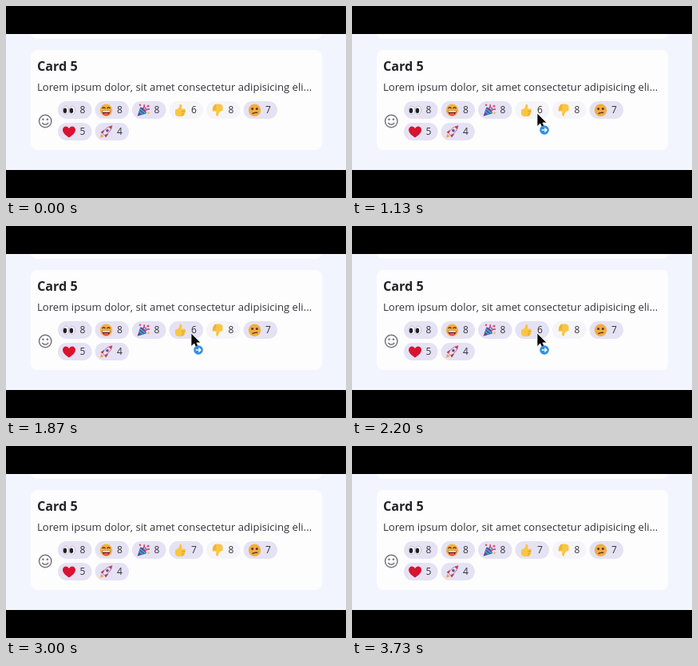
An HTML page for the animation above (3.79 s loop, 426x240 px).

```html
<!DOCTYPE html>
<html lang="en">
<head>
<meta charset="utf-8">
<title>Card reactions</title>
<style>
  html, body { margin: 0; width: 100%; height: 100%; overflow: hidden; background: #000; }
  svg { display: block; width: 426px; height: 240px; }
  text { font-family: "Open Sans", "Noto Sans", sans-serif; fill: #333338; }
</style>
</head>
<body>
<svg viewBox="0 0 426 240">
  <defs>
    <clipPath id="view"><rect y="35" width="426" height="170"/></clipPath>
    <g id="eyes">
      <g fill="#fff" stroke="#b3aebb" stroke-width=".8"><ellipse cx="-4" rx="3.6" ry="5.2"/><ellipse cx="4" rx="3.6" ry="5.2"/></g>
      <g fill="#201d25"><ellipse cx="-5" cy=".5" rx="2.2" ry="3.2"/><ellipse cx="3" cy=".5" rx="2.2" ry="3.2"/></g>
    </g>
    <g id="grin">
      <circle r="7.7" fill="#f6b13c"/>
      <path d="M-5 -2q2-3 4 0M1-2q2-3 4 0" fill="none" stroke="#5b3427" stroke-width="1.4"/>
      <path d="M-5.5 .5h11q-.8 6-5.5 6t-5.5-6z" fill="#7a2634"/>
      <path d="M-5 .7H5L4.4 2.4h-8.8z" fill="#fff"/>
      <ellipse cy="5" rx="3" ry="1.4" fill="#ef5360"/>
    </g>
    <g id="party">
      <path d="M-7.5 7.5L-3.5-4Q3-2 4 4z" fill="#5b4c96"/>
      <path d="M-5.5 1.5L0 5.4M-4.4-1.8L3.5 4.3" stroke="#39aacb" stroke-width="1.6"/>
      <path d="M-1-2q3-1 2-5M2 1q3-3 6-2" fill="none" stroke="#d63d73" stroke-width="1.7"/>
      <g fill="#e54b60"><circle cx="6" cy="-5" r="1.4"/><circle cx="-4" cy="-6.5" r="1.2"/></g>
      <circle cx="3" cy="-2.5" r="1.2" fill="#3b9bd3"/><circle cx="6.5" cy="3.5" r="1.2" fill="#edb23e"/>
    </g>
    <g id="thumb">
      <path d="M-6.5-.5L-2.8-2Q-.8-4.6-.9-7Q1.8-8.5 2-4.8L1.5-1.6H5.3Q7.4-1 6 1.1Q7 2.8 5.4 3.7Q6 5.6 4.1 6Q4 7.7 1.8 7.7H-2.7Q-6.5 7-6.5 4z" fill="#f9c644"/>
      <path d="M1.5 1.3h4.3M1.8 3.8h3.5M1.6 6h2.5" stroke="#d99226" stroke-width=".8"/>
    </g>
    <g id="down"><use href="#thumb" transform="scale(-1)"/></g>
    <g id="confused">
      <circle r="7.7" fill="#f3ac40"/>
      <g fill="#59372c"><circle cx="-2.8" cy="-1.6" r="1.5"/><circle cx="2.8" cy="-1.6" r="1.5"/></g>
      <path d="M-3 4.4Q0 2.5 3.8 3.2" fill="none" stroke="#59372c" stroke-width="1.4"/>
    </g>
    <g id="heart"><path d="M0 7.3C-5 4-8 1-8-2.5C-8-7-2-8.5 0-4C2-8.5 8-7 8-2.5C8 1 5 4 0 7.3z" fill="#d9132f"/></g>
    <g id="rocket">
      <path d="M-7.5 7.5l1.2-5 3.5 3.4z" fill="#f2a63a"/>
      <path d="M-2.5-2.8L-7 .8l3.2 1.4zM2.8 2.5L-.5 7.2l-1.8-3.4z" fill="#c72959"/>
      <path d="M-4.5 2Q-1-6 7.5-7.5Q6 1-2 4.5z" fill="#e8dfed" stroke="#a74778" stroke-width=".7"/>
      <path d="M3.2-6L7.5-7.5L6-3.2z" fill="#d92c52"/>
      <circle cx="1.5" cy="-1.5" r="1.8" fill="#56549c"/>
    </g>
  </defs>
  <g clip-path="url(#view)">
    <rect y="35" width="426" height="170" fill="#f2f5fd"/>
    <g fill="#fdfdfe"><rect x="31" y="10" width="365" height="31" rx="8"/><rect x="31" y="55" width="365" height="125" rx="8"/></g>
    <text x="39" y="80.5" font-size="16.2" font-weight="700" style="fill:#242428">Card 5</text>
    <text x="39" y="106" font-size="13.15">Lorem ipsum dolor, sit amet consectetur adipisicing eli...</text>
    <g fill="none" stroke="#77777d" stroke-width="1.5">
      <circle cx="49.2" cy="144" r="7.7"/><path d="M45.2 146q4 4.5 8 0"/>
      <g fill="#77777d" stroke="none"><circle cx="46.5" cy="141.8" r="1.3"/><circle cx="51.9" cy="141.8" r="1.3"/></g>
    </g>
    <g id="chips"></g>
    <g id="cursor">
      <path d="M0 0V16.5L3.8 13L6.8 19.6L9.8 18.2L6.9 11.9H12z" fill="#08080a" stroke="#fff" stroke-width=".7"/>
      <g id="badge">
        <circle cx="9" cy="21" r="5.8" fill="#328fe0"/>
        <path d="M5.8 21h6M9.4 18.5l2.5 2.5-2.5 2.5" fill="none" stroke="#fff" stroke-width="1.4"/>
      </g>
    </g>
  </g>
</svg>
<script>
const LOOP = 3790, SELECTED = "#e5e2f4", IDLE = "#f5f4f8";
const HOVER_AT = 1330, COUNT_AT = 2600;
const $ = id => document.getElementById(id);
const reactions = [["eyes", 8], ["grin", 8], ["party", 8], ["thumb", 6], ["down", 8], ["confused", 7], ["heart", 5], ["rocket", 4]];

$("chips").innerHTML = reactions.map(([name, count], i) => {
  const x = 65 + (i % 6) * 46.5, y = i < 6 ? 119 : 146;
  return `<g id="chip-${name}" transform="translate(${x} ${y})">
    <rect width="42.5" height="22" rx="11" fill="${name === "down" ? IDLE : SELECTED}"/>
    <g transform="translate(14 11.2)"><use href="#${name}"/></g>
    <text x="31" y="15.3" font-size="12" text-anchor="middle">${count}</text></g>`;
}).join("");

const chip = $("chip-thumb");
const [pill, icon, label] = ["rect", "use", "text"].map(tag => chip.querySelector(tag));

// Cursor waypoints: time, x, y
const path = [[270, 310, 208], [530, 242, 144], [730, 232, 134], [2600, 232, 134], [2870, 300, 208]];

function cursorAt(t) {
  const i = path.findIndex(p => p[0] > t);
  if (i < 1) return null;
  const [t0, x0, y0] = path[i - 1], [t1, x1, y1] = path[i];
  const u = (t - t0) / (t1 - t0), k = u * u * (3 - 2 * u);
  return [x0 + (x1 - x0) * k, y0 + (y1 - y0) * k];
}

function draw(now) {
  const t = now % LOOP, pos = cursorAt(t);
  $("cursor").style.display = pos ? "" : "none";
  if (pos) $("cursor").setAttribute("transform", `translate(${pos})`);
  $("badge").style.display = t >= 800 && t < COUNT_AT ? "" : "none";
  pill.setAttribute("fill", t >= HOVER_AT ? SELECTED : IDLE);
  label.textContent = t >= COUNT_AT ? 7 : 6;
  const pulse = Math.max(0, 1 - Math.abs(t - 1530) / 200);
  icon.setAttribute("transform", `scale(${1 + 0.15 * pulse})`);
  requestAnimationFrame(draw);
}
requestAnimationFrame(draw);
</script>
</body>
</html>
```
